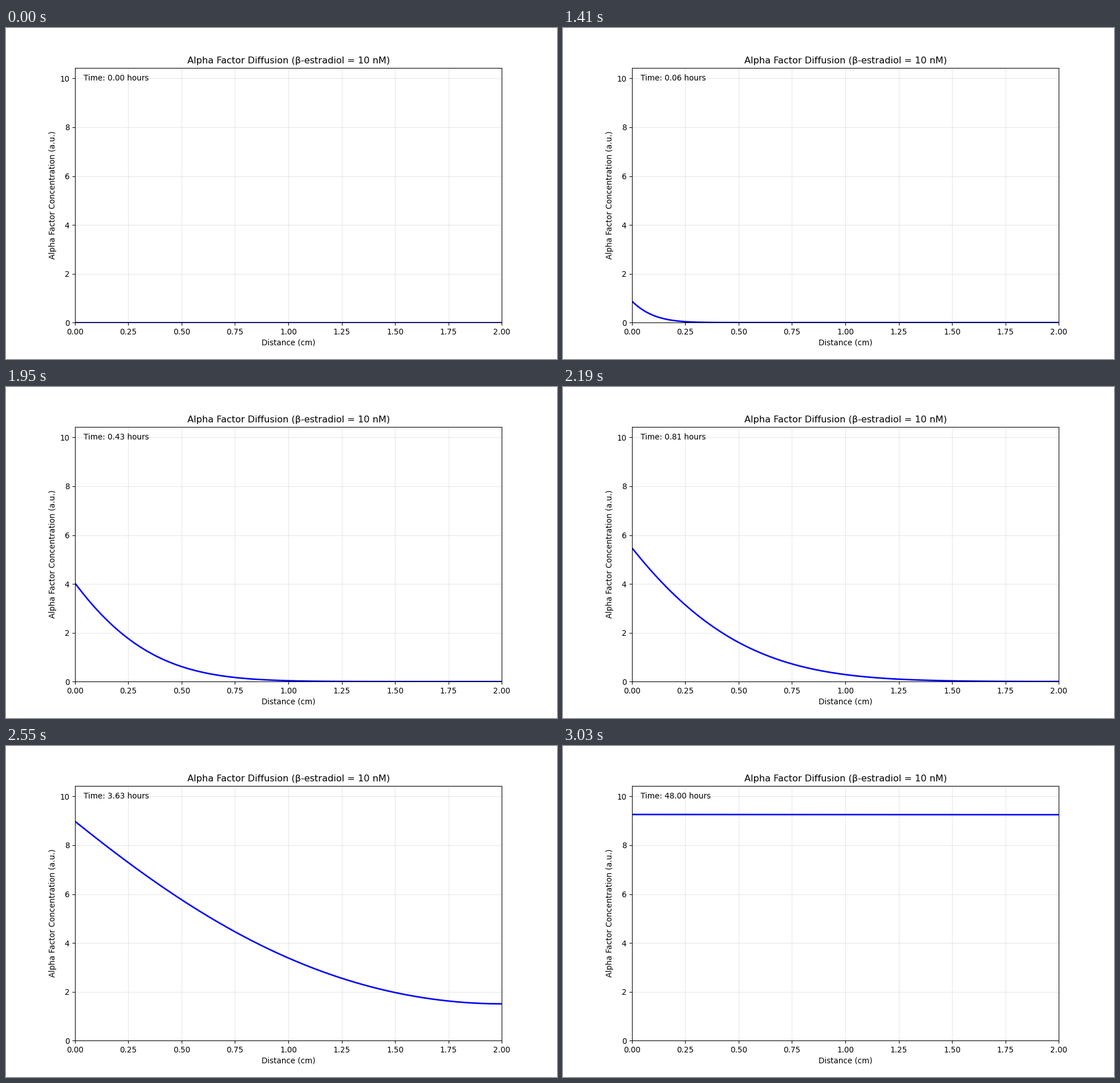
A matplotlib script that plays this animation: 966 px wide and 580 px high, repeating every 3060 ms.

```python
import numpy as np
import matplotlib.pyplot as plt
from matplotlib.animation import FuncAnimation

DPI = 100
SCALE = 0.966       # everything relative to a 10 x 6 inch layout
FRAMES, INTERVAL = 102, 30

LENGTH = 2.0        # cm
DIFFUSIVITY = 0.237  # cm^2 / h
FLUX = 2.97         # secretion rate at x = 0
DECAY = 0.159       # 1 / h, loss of secretion
RAMP = 0.053        # h, onset of secretion
FIRST_STEP = 19     # the profile is exactly zero before this step

plt.rcParams.update({
    "font.family": "DejaVu Sans",
    "font.size": 9.72,
    "axes.titlesize": 12 * SCALE,
    "axes.titlepad": 6 * SCALE,
    "axes.labelpad": 4 * SCALE,
    "axes.linewidth": 0.8 * SCALE,
    "grid.linewidth": 0.8 * SCALE,
    "lines.linewidth": 2 * SCALE,
})
for axis in ("xtick", "ytick"):
    plt.rcParams[axis + ".major.size"] = 3.5 * SCALE
    plt.rcParams[axis + ".major.pad"] = 3.5 * SCALE
    plt.rcParams[axis + ".major.width"] = 0.8 * SCALE

x = np.linspace(0, LENGTH, 201)
k = np.arange(1, 1501) * np.pi / LENGTH
rates = DIFFUSIVITY * k**2
modes = np.cos(np.outer(x, k))


def hermite(at, xs, ys):
    """Smooth curve through a few points."""
    slopes = np.gradient(ys, xs)
    i = np.clip(np.searchsorted(xs, at, side="right") - 1, 0, len(xs) - 2)
    h = xs[i + 1] - xs[i]
    s = (at - xs[i]) / h
    return ((1 + 2 * s) * (1 - s)**2 * ys[i] + s * (1 - s)**2 * h * slopes[i]
            + s * s * (3 - 2 * s) * ys[i + 1] + s * s * (s - 1) * h * slopes[i + 1])


# Simulated time grows roughly exponentially with the step.
STEPS = np.array([19, 30, 47, 57, 73, 83, 85, 101], float)
HOURS = np.array([1.6e-5, 0.004, 0.0627, 0.23, 0.81, 2.83, 3.63, 48])


def hours(step):
    if step < FIRST_STEP:
        return 0.0
    return float(np.exp(hermite(step, STEPS, np.log(HOURS))))


def response(t, r):
    """Profile after a boundary flux exp(-r t) with a closed far end."""
    mean = (1 - np.exp(-r * t)) / (r * LENGTH)
    weights = (np.exp(-r * t) - np.exp(-rates * t)) / (rates - r)
    return mean + 2 / LENGTH * modes @ weights


def profile(t):
    if t == 0:
        return np.zeros_like(x)
    return FLUX * (response(t, DECAY) - response(t, DECAY + 1 / RAMP))


fig, ax = plt.subplots(figsize=(9.66, 5.8), dpi=DPI)
ax.set_xlim(0, LENGTH)
ax.set_ylim(0, 10.44)
ax.set_xlabel("Distance (cm)")
ax.set_ylabel("Alpha Factor Concentration (a.u.)")
ax.set_title("Alpha Factor Diffusion (β-estradiol = 10 nM)")
ax.grid(True, alpha=0.3)
line, = ax.plot(x, np.zeros_like(x), "b-")
label = ax.text(0.02, 0.95, "", transform=ax.transAxes)


def update(step):
    t = hours(step)
    line.set_ydata(profile(t))
    label.set_text(f"Time: {t:.2f} hours")
    return line, label


anim = FuncAnimation(fig, update, frames=FRAMES, interval=INTERVAL,
                     repeat=True, repeat_delay=0)
plt.show()
```
